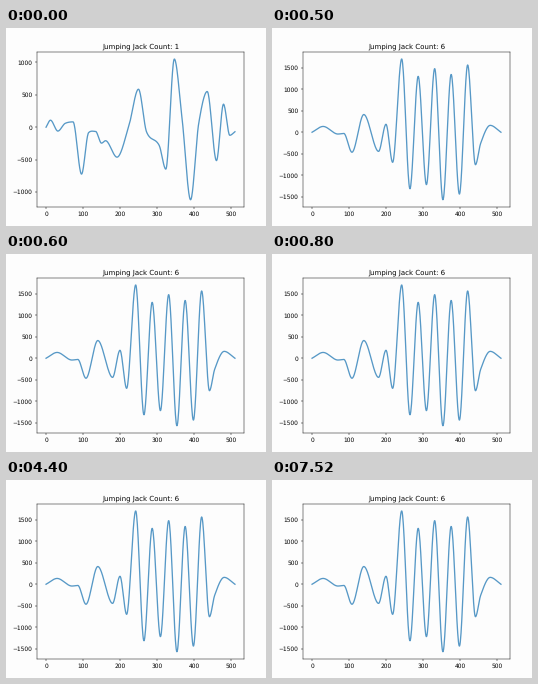
A matplotlib script that plays this animation: 260x198 px, repeating every 8 s.

```python
import matplotlib.pyplot as plt
import numpy as np
from matplotlib.animation import FuncAnimation
from matplotlib.ticker import MultipleLocator

W, H = 260, 198
SCALE = 0.4194  # default 640x480 chart styling, shrunk to the stage
STEP_MS = 100
FRAMES = 80
SWITCH = 5
SAMPLES = np.arange(512)

plt.rcParams.update({
    "font.family": "DejaVu Sans",
    "text.hinting": "no_hinting",
    "font.size": 10 * SCALE,
    "axes.titlesize": 12 * SCALE,
    "axes.titlepad": 6 * SCALE,
    "axes.linewidth": 0.8 * SCALE,
    "axes.facecolor": "#fdfdfd",
    "figure.facecolor": "#fdfdfd",
})
for axis in ("xtick", "ytick"):
    plt.rcParams.update({
        f"{axis}.labelsize": 10 * SCALE,
        f"{axis}.major.size": 3.5 * SCALE,
        f"{axis}.major.width": 0.8 * SCALE,
        f"{axis}.major.pad": 3.5 * SCALE,
    })


def swing(points):
    """Ease from point to point, flat at every turning point."""
    x, y = np.array(points, float).T
    dx = np.diff(x)
    rate = np.diff(y) / dx
    product = rate[:-1] * rate[1:]
    inner = np.sign(rate[1:]) * np.sqrt(np.maximum(product, 0))
    slope = np.concatenate([rate[:1], inner, rate[-1:]])
    i = np.clip(np.searchsorted(x, SAMPLES, "right") - 1, 0, len(dx) - 1)
    t = (SAMPLES - x[i]) / dx[i]
    ease = t * t * (3 - 2 * t)
    bend = slope[i] * t * (1 - t) ** 2 - slope[i + 1] * t**2 * (1 - t)
    return y[i] + (y[i + 1] - y[i]) * ease + dx[i] * bend


def single_jump():
    rest = [(0, 0), (12, 108), (32, -60), (52, 60), (73, 82), (96, -723),
            (115, -85), (134, -65), (150, -246), (161, -208), (192, -462)]
    lift = [(224, 20), (250, 585), (272, -75), (306, -280), (324, -646)]
    jump = [(347, 1050), (368, 130), (391, -1118), (413, 60), (436, 550)]
    settle = [(461, -515), (480, 355), (497, -125), (511, -70)]
    return swing(rest + lift + jump + settle)


def jump_series():
    start = [(0, 0), (30, 135), (70, -42), (86, -28), (108, -465),
             (140, 412), (180, -445), (200, 185), (218, -700)]
    # The jumps keep a steady beat; only their height varies
    heights = [1705, 1315, 1300, 1220, 1480, 1570, 1345, 1440, 1565]
    jumps = [(242.5 + 22.3 * k, (-1) ** k * h) for k, h in enumerate(heights)]
    settle = [(442, -755), (456, -260), (482, 160), (511, 0)]
    return swing(start + jumps + settle)


charts = [(1, single_jump()), (6, jump_series())]

fig = plt.figure(figsize=(W / 100, H / 100), dpi=100)
ax = fig.add_axes([30.6 / W, 19.2 / H, 207.8 / W, 154.8 / H])
ax.xaxis.set_major_locator(MultipleLocator(100))
ax.yaxis.set_major_locator(MultipleLocator(500))
line, = ax.plot(SAMPLES, charts[0][1], color="#1f77b4", lw=0.95, alpha=0.75)
title = ax.set_title("")


def draw(frame):
    count, signal = charts[frame >= SWITCH]
    line.set_ydata(signal)
    title.set_text(f"Jumping Jack Count: {count}")
    ax.relim()
    ax.autoscale_view()
    return line, title


anim = FuncAnimation(fig, draw, frames=FRAMES, interval=STEP_MS,
                     init_func=lambda: draw(0), repeat=True, repeat_delay=0)
plt.show()
```
